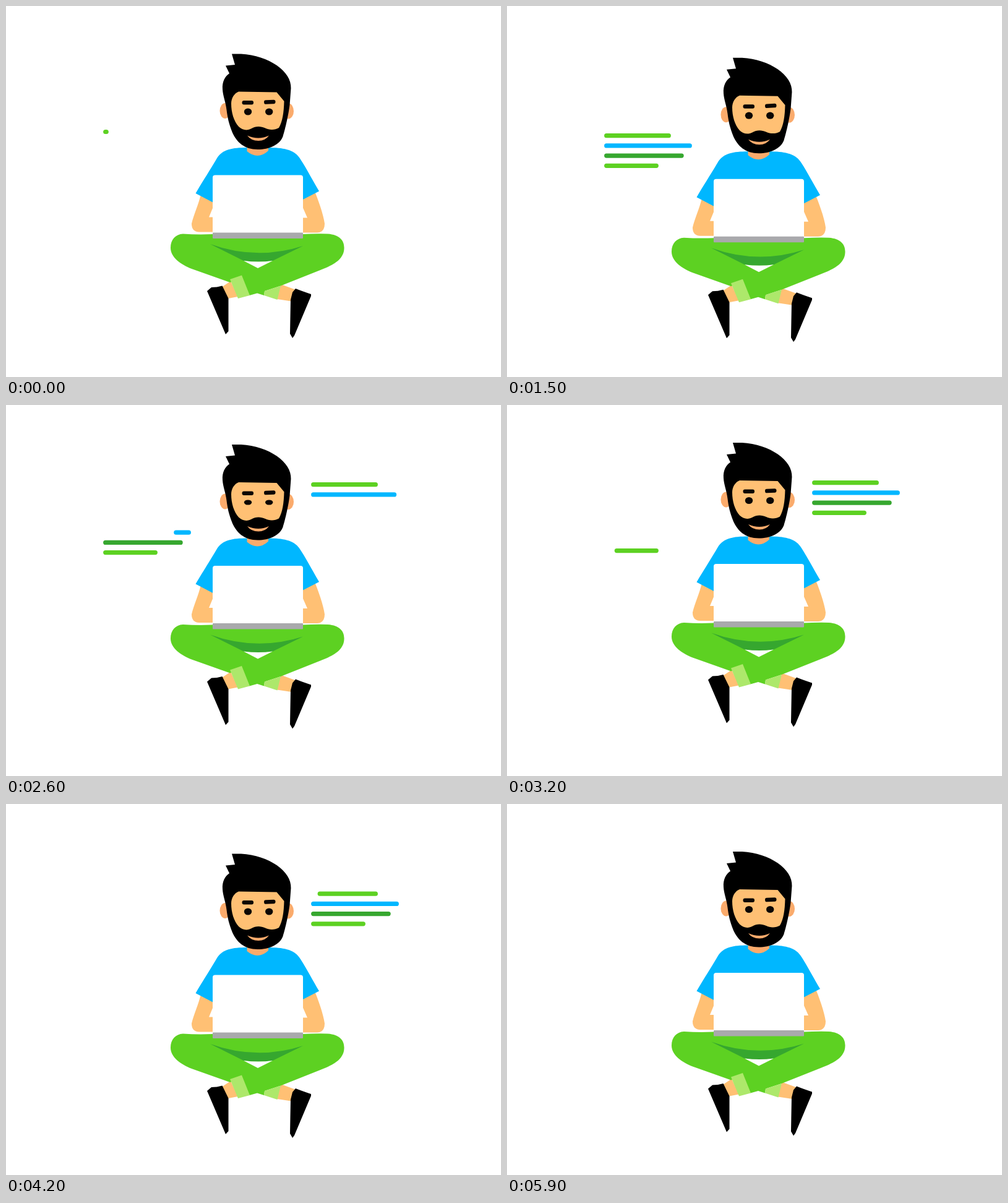
Recreate the animation shown at these times as an HTML page. Size 800 by 600 pixels, loop 6 s.

```html
<!DOCTYPE html>
<html lang="en">
<head>
<meta charset="utf-8">
<title>Coder at work</title>
<style>
  html, body { margin: 0; width: 100%; height: 100%; overflow: hidden; background: #fff; }
  svg { display: block; width: 100vw; height: 100vh; }
  .skin { fill: #ffc074; }
  .shade { fill: #fbab6c; }
  .shirt { fill: #00b7ff; }
  .lime { fill: #5dd122; }
  .green { fill: #36a72f; }
  .cuff { fill: #ade86b; }
  .white { fill: #fff; }
  .grey { fill: #a9a9ac; }
  .brown { fill: #0c0603; }
</style>
</head>
<body>
<svg viewBox="0 0 800 600">
  <g id="scene">
    <!-- legs -->
    <path class="skin" d="M348 455L363 445L375 470L359 473ZM444 450L468.5 459L461 477.5L438 474Z"/>
    <path d="M325 461L332 455Q341 455 349.5 452.5L359.5 473V526L355 531Z"/>
    <path d="M463 463L468 457Q478 461 493 466V469L466 533L463 537L459 530L460 475Z"/>
    <path class="lime" d="M286 368.5Q310 370 334 369H480Q500 368 520 368.5C540 370 547 380 546.5 392C546 408 533 416 518 423L444 452.5L418 461L417 468L406 464.5L393.5 468L381 440L362 447L300 425C283 418 266 407 266 391C266 378 274 369 286 368.5Z"/>
    <path class="green" d="M330 385L384 412Q408 415 431 412L480 388Q405 412 330 385Z"/>
    <path class="white" d="M384 412Q408 415 431 412L407 424Z"/>
    <path class="cuff" d="M362 442L381 435.5L394 468L375 473ZM418 461L444 452.5L438.5 475L417 468Z"/>

    <!-- torso and arms -->
    <path class="skin" d="M315 304C311 322 303 338 300 352Q300 365 312 365.5H336V341.5H328L336 322V310Z"/>
    <path class="skin" d="M499 300C507 320 513 338 515 352Q515 366 503 366.5H478V342.5H487L478 322V308Z"/>
    <path class="shirt" d="M390 229C365 229 350 232 341 246C330 265 315 288 306.5 303L336 318.5V300H478V314L506 299.5C495 281 483 258 474 245C465 232 447 229 424 229Z"/>
    <path class="shade" d="M389.5 222H424V234Q407 249.5 389.5 235Z"/>
    <rect class="white" x="334" y="273.5" width="146" height="102" rx="4"/>
    <rect class="grey" x="334" y="366.5" width="146" height="9.5" rx="1"/>

    <!-- head -->
    <ellipse class="shade" cx="354" cy="169.5" rx="8.5" ry="12.5"/>
    <ellipse class="shade" cx="456.5" cy="170" rx="8.5" ry="12.5"/>
    <path d="M365 77.5H380C425 80 462 106 460.5 133L458.5 160C456 180 450 203 447.5 211C442 225 425 232 407 232C385 232 373 220 366 205C360 190 358 180 356.5 168C355 155 350.5 145 350 135C349 122 354 114 361 109L355 96.5L370 95Z"/>
    <path class="skin" d="M376 138.5L437.5 139.5L449.5 154C449 172 447 187 441 197C434 201 425 200.5 419 197.5C412 194 403 194 397 198C390 202 382 201 376 195C368 186 364 172 364 158C364 149 369 141 376 138.5Z"/>
    <path class="shade" d="M390 209.5Q408 217.5 425 209.5Q419 218 408 218Q396 218 390 209.5Z"/>
    <rect class="brown" x="381.5" y="153" width="18.5" height="6.5" rx="3"/>
    <rect class="brown" x="417" y="152" width="18.5" height="6.5" rx="3" transform="rotate(-3 426 155)"/>
    <ellipse class="brown eye" cx="391" cy="171" rx="6.2" ry="5.6"/>
    <ellipse class="brown eye" cx="425.2" cy="171" rx="6.2" ry="5.6"/>
    <g id="code" fill="none" stroke-width="7.2" stroke-linecap="round"></g>
  </g>
</svg>
<script>
const LOOP = 6000, STEP = 100;
const scene = document.getElementById('scene');
const code = document.getElementById('code');
const eyes = document.querySelectorAll('.eye');

// Vertical drift: [ms, px]
const drift = [[0, 0], [700, 9.7], [1020, 13.5], [1500, 6.2], [2100, -3.4], [2600, -13.5],
  [3000, -20.3], [3200, -16.5], [3500, -10.2], [4200, 3], [4900, 12.6], [5020, 13.5],
  [5600, 4], [5900, -0.5], [6000, 0]];
const blinks = [2490, 4830];

const lines = [[100.6, '#5dd122'], [134.6, '#00b7ff'], [121.4, '#36a72f'], [80.6, '#5dd122']];
// Each block types its lines one after another, then wipes them
const blocks = [
  { x: 160.7, y: 203.5, type: 0, typeMs: 200, wipe: 1916, wipeMs: 390 },
  { x: 496.7, y: 142.2, type: 2220, typeMs: 200, wipe: 4127, wipeMs: 364 }
];

const clamp = p => Math.min(1, Math.max(0, p));
const ease = p => p * p * (3 - 2 * p);

function driftAt(t) {
  const i = drift.findIndex(k => k[0] > t);
  const [t0, y0] = drift[i - 1], [t1, y1] = drift[i];
  return y0 + (y1 - y0) * (t - t0) / (t1 - t0);
}

for (const b of blocks) {
  b.rows = lines.map(([, color]) => {
    const p = document.createElementNS('http://www.w3.org/2000/svg', 'path');
    p.setAttribute('stroke', color);
    return code.appendChild(p);
  });
}

function draw(t) {
  scene.setAttribute('transform', `translate(0 ${driftAt(t).toFixed(2)})`);

  const gap = Math.min(...blinks.map(c => Math.abs(t - c)));
  const open = Math.max(0.12, clamp(gap / 150));
  eyes.forEach(e => e.setAttribute('ry', 5.6 * open));

  for (const b of blocks) {
    b.rows.forEach((row, i) => {
      const typed = (t - b.type) / b.typeMs - i;
      const wiped = (t - b.wipe) / b.wipeMs - i;
      const len = lines[i][0];
      const from = b.x + len * ease(clamp(wiped));
      const to = b.x + Math.max(1.5, len * ease(clamp(typed)));
      const y = b.y + i * 16.2;
      const shown = typed >= 0 && wiped < 1;
      row.setAttribute('d', shown ? `M${from} ${y}H${to}` : '');
    });
  }
}

const start = performance.now();
function tick() {
  const t = (performance.now() - start) % LOOP;
  draw(Math.floor(t / STEP) * STEP);
  requestAnimationFrame(tick);
}
tick();
</script>
</body>
</html>
```
